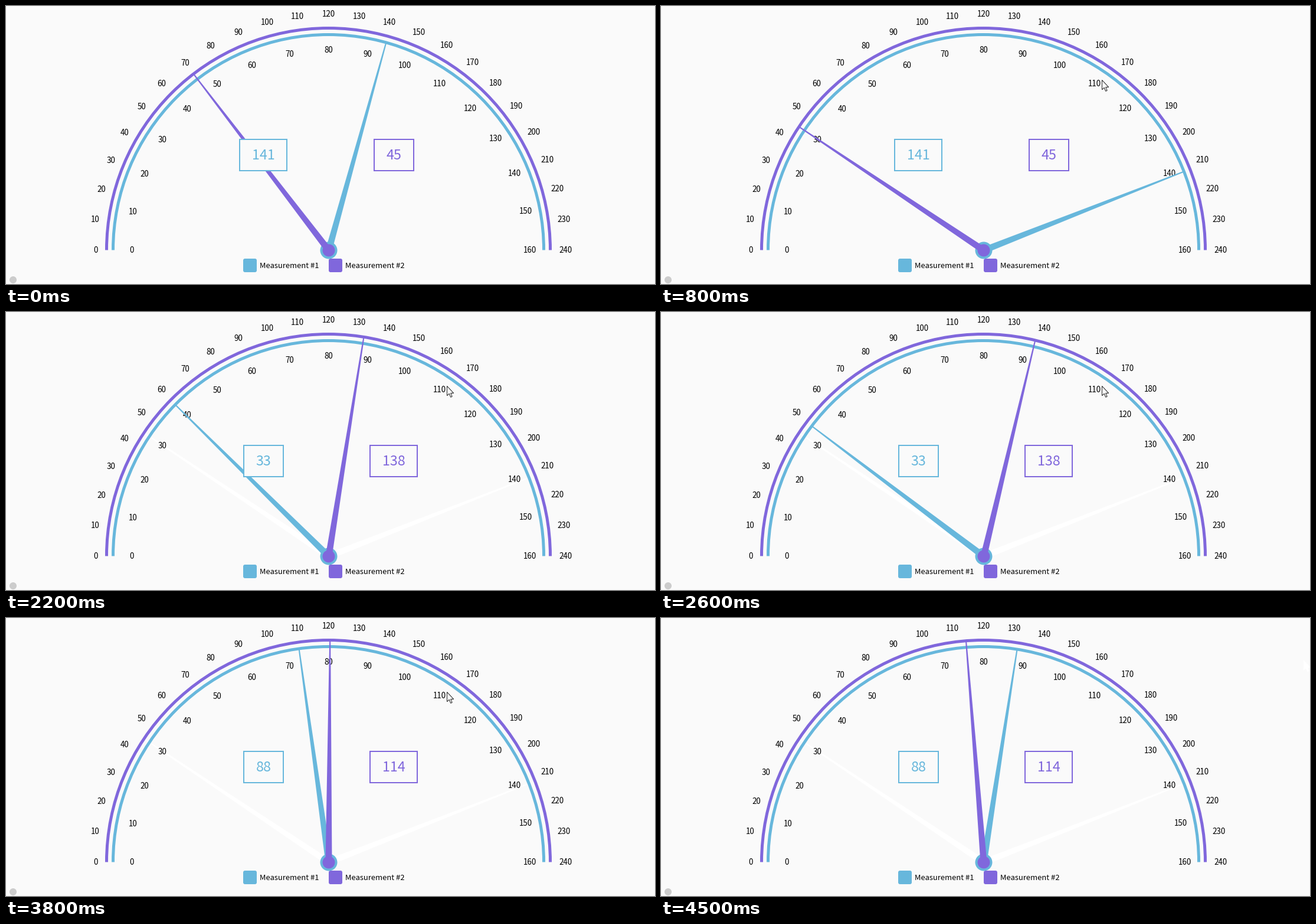
Recreate the animation shown at these times as a matplotlib script. Size 1100 by 471 pixels, loop 5100 ms.

```python
import numpy as np
import matplotlib.pyplot as plt
from matplotlib.animation import FuncAnimation
from matplotlib.patches import Arc, Circle, FancyBboxPatch, Polygon, Rectangle

W, H, DPI = 1100, 471, 100
PT = 72 / DPI  # points per pixel
STEP, FRAMES = 100, 51
CX, CY = 546.5, 413.5
BACK, BLUE, PURPLE = "#fafafa", "#67b7dc", "#8067dc"
FONT = "Noto Sans CJK JP"

STARTS, SWEEP = (-150, 1650, 3480), 910  # ms
BLUE_VALUES = (60, 141, 33, 88)
PURPLE_VALUES = (88, 45, 138, 114)

ENTRY, REST, EXIT = np.array([(1057, 56), (747.5, 125.5), (1089.5, 72)])
ARROW = np.array([(0, 0), (0, 16.2), (3.7, 12.8), (6.2, 18.8), (8.6, 17.8),
                  (6.2, 12), (11.2, 12)])

fig = plt.figure(figsize=(W / DPI, H / DPI), dpi=DPI, facecolor=BACK)
ax = fig.add_axes([0, 0, 1, 1])
ax.set_xlim(0, W)
ax.set_ylim(H, 0)
ax.axis("off")


def write(x, y, s, size, color="black", ha="center", z=3):
    return ax.text(x, y, s, fontsize=size * PT, family=FONT, color=color,
                   ha=ha, va="baseline", zorder=z)


def polar(radius, angle):
    return np.array([CX + radius * np.cos(angle), CY - radius * np.sin(angle)])


def progress(t, start, length):
    return np.clip((t - start) / length, 0, 1)


class Gauge:
    def __init__(self, top, radius, label_radius, color, values, box_x, z):
        self.top, self.radius, self.values, self.box_x = top, radius, values, box_x
        ax.add_patch(Arc((CX, CY), 2 * radius, 2 * radius, theta1=180, theta2=360,
                         color=color, lw=5 * PT, capstyle="butt", zorder=2))
        for v in range(0, top + 1, 10):
            a = self.angle(v)
            half = 3.75 * len(str(v))
            x, y = polar(label_radius + np.hypot(half * np.cos(a), 9 * np.sin(a)), a)
            write(x, y + 4.9, str(v), 13.4)
        # Pale trace left where the hand rested
        self.trace = ax.add_patch(Polygon(self.shape(values[1]), color="white",
                                          lw=0, zorder=1))
        self.hand = ax.add_patch(Polygon(self.shape(0), color=color, lw=0, zorder=z))
        self.box = ax.add_patch(Rectangle((0, 226), 1, 53, fc=BACK, ec=color,
                                          lw=2 * PT, zorder=8))
        self.number = write(box_x, 260, "", 23.3, color, z=9)

    def angle(self, value):
        return np.pi * (1 - value / self.top)

    def shape(self, value):
        a = self.angle(value)
        side = np.array([np.sin(a), np.cos(a)])
        base, tip = polar(0, a) + 0.5, polar(self.radius, a)
        return [base - 5.5 * side, base + 5.5 * side, tip + side, tip - side]

    def update(self, t):
        k = sum(t >= s for s in STARTS) - 1
        old, new = self.values[k:k + 2]
        left = (1 - progress(t, STARTS[k], SWEEP)) ** 3  # cubic ease-out
        self.hand.set_xy(self.shape(new + (old - new) * left))
        self.trace.set_visible(k > 0)
        half = 13 * len(str(new)) / 2 + 21
        self.box.set_x(self.box_x - half)
        self.box.set_width(2 * half - 1)
        self.number.set_text(str(new))


gauges = [Gauge(160, 365, 330, BLUE, BLUE_VALUES, 436.5, 4),
          Gauge(240, 376, 391, PURPLE, PURPLE_VALUES, 657.5, 6)]
ax.add_patch(Circle((547, 414), 14.5, color=BLUE, lw=0, zorder=5))
ax.add_patch(Circle((547, 414), 10.5, color=PURPLE, lw=0, zorder=7))

for i, color in enumerate((BLUE, PURPLE)):
    x = 402 + 145 * i
    ax.add_patch(FancyBboxPatch((x, 428), 23, 23, fc=color, lw=0, zorder=3,
                                boxstyle="round,pad=0,rounding_size=3"))
    write(x + 28, 444.3, f"Measurement #{i + 1}", 13, ha="left")

ax.add_patch(Circle((12, 464), 6, color="#cccccc", lw=0, zorder=3))

arrow = ax.add_patch(Polygon(ARROW, fc="white", lw=PT, zorder=10))


def pointer(t):
    arrive = (1 - progress(t, 200, 550)) ** 2
    leave = progress(t, 4050, 350) ** 3
    return REST + (ENTRY - REST) * arrive + (EXIT - REST) * leave


def draw(i):
    t = i * STEP
    for gauge in gauges:
        gauge.update(t)
    arrow.set_xy(ARROW + pointer(t))
    arrow.set_visible(t >= 200)
    arrow.set_edgecolor("white" if t > 4400 else "#222222")
    return []


anim = FuncAnimation(fig, draw, frames=FRAMES, interval=STEP, repeat=True,
                     repeat_delay=0, init_func=lambda: draw(0))
plt.show()
```
